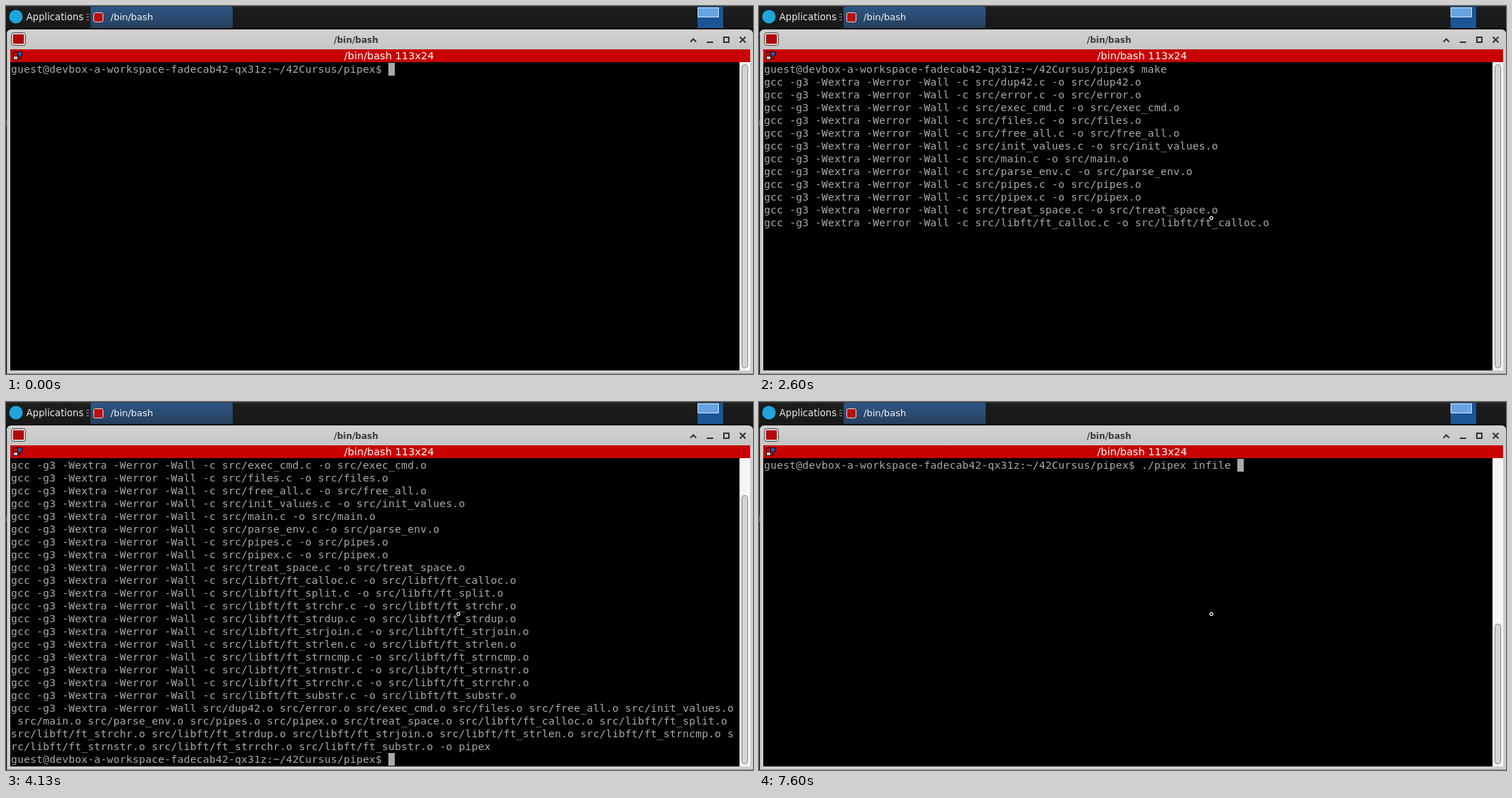
Animation of 1051x518 px, one loop 8 s. Source, as an HTML page with a canvas:

```html
<!DOCTYPE html>
<html lang="en">
<head>
<meta charset="utf-8">
<title>Terminal build</title>
<style>
  html, body { margin: 0; width: 100%; height: 100%; overflow: hidden; background: #000; }
  canvas { display: block; }
</style>
</head>
<body>
<canvas id="stage" width="1051" height="518"></canvas>
<script>
const ctx = document.getElementById('stage').getContext('2d', { alpha: false });
const LOOP = 8000, COLS = 113, ROWS = 24, CELL = 9, LINE = 18;
const ENTER = 1610, LINE_TIME = 88, SCROLL = 3385, PROMPT_BACK = 3600, CLEAR = 4270;
const SANS = '"DejaVu Sans", sans-serif', MONO = '"DejaVu Sans Mono", monospace';
const PROMPT = 'guest@devbox-a-workspace-fadecab42-qx31z:~/42Cursus/pipex$ ';

const files = [
  ...'dup42 error exec_cmd files free_all init_values main parse_env pipes pipex treat_space'.split(' '),
  ...'calloc split strchr strdup strjoin strlen strncmp strnstr strrchr substr'.split(' ').map(f => 'libft/ft_' + f)
].map(f => 'src/' + f);
const GCC = 'gcc -g3 -Wextra -Werror -Wall ';
const compileLines = files.map(f => `${GCC}-c ${f}.c -o ${f}.o`);
const linkLines = (GCC + files.map(f => f + '.o').join(' ') + ' -o pipex').match(new RegExp(`.{1,${COLS}}`, 'g'));

// Typed input: [time, command line so far]
const buildInput = [[0, ''], [1270, 'm'], [1400, 'ma'], [1470, 'mak'], [1530, 'make']];
const runInput = [
  [CLEAR, ''], [4800, '.'], [5000, './'], [5265, './p'], [5325, './pi'], [5465, './pipex '],
  [6995, './pipex i'], [7465, './pipex in'], [7530, './pipex inf'], [7595, './pipex infile ']
];
const keyTimes = [1270, 1400, 1470, 1530, ENTER, CLEAR, 4800, 5000, 5265, 5325, 6995, 7465, 7530];

const latest = (input, t) => input.filter(([at]) => at <= t).pop()[1];

function terminalLines(t) {
  if (t >= CLEAR) return [PROMPT + latest(runInput, t)];
  const lines = [PROMPT + latest(buildInput, t)];
  if (t < ENTER) return lines;
  const printed = Math.floor((t - ENTER) / LINE_TIME) + 1;
  lines.push(...compileLines.slice(0, printed));
  if (printed > files.length) lines.push(...linkLines);
  lines.push(t >= PROMPT_BACK ? PROMPT : '');
  return lines;
}

function cursorVisible(t) {
  const last = keyTimes.filter(k => k <= t).pop();
  return last === undefined || Math.floor((t - last) / 600) % 2 === 0;
}

function rect(x, y, w, h, fill) {
  ctx.fillStyle = fill;
  ctx.fillRect(x, y, w, h);
}

function rounded(x, y, w, h, r, fill, stroke) {
  ctx.beginPath();
  ctx.roundRect(x, y, w, h, r);
  ctx.fillStyle = fill;
  ctx.fill();
  if (stroke) {
    ctx.strokeStyle = stroke;
    ctx.lineWidth = 1;
    ctx.stroke();
  }
}

function label(text, x, y, font, fill, align = 'left') {
  ctx.font = font;
  ctx.fillStyle = fill;
  ctx.textAlign = align;
  ctx.fillText(text, x, y);
}

function path(d, stroke, width) {
  ctx.strokeStyle = stroke;
  ctx.lineWidth = width;
  ctx.stroke(new Path2D(d));
}

function vertical(y0, y1, top, bottom) {
  const g = ctx.createLinearGradient(0, y0, 0, y1);
  g.addColorStop(0, top);
  g.addColorStop(1, bottom);
  return g;
}

function drawPanel() {
  rect(0, 0, 1051, 518, '#101010');
  rect(0, 0, 1051, 31, vertical(0, 31, '#1d1d1d', '#181818'));
  rect(0, 0, 1051, 1, '#3c3c3c');
  rect(0, 160, 1, 9, '#1d5a94');
  ctx.beginPath();
  ctx.arc(14, 15, 9.5, 0, 7);
  ctx.fillStyle = '#1ea5dc';
  ctx.fill();
  label('Applications', 28.5, 20, '13.2px ' + SANS, '#eeeeee');
  for (const y of [11, 15, 19]) rect(113, y, 4, 1, '#8c8c8c');
  rounded(119, 1, 200, 30, 2, vertical(1, 31, '#2d5686', '#263f5c'));
  rounded(123.5, 9.5, 13, 13, 2, '#b80f0f', '#e8d4d0');
  label('/bin/bash', 147, 20, '13px ' + SANS, '#f4f4f4');
  rect(973, 1, 36, 30, '#1b5596');
  rect(973, 2, 30, 14, '#d5e5f7');
  rect(974, 3, 28, 12, '#68a3e3');
}

function drawWindow() {
  rounded(1, 33, 1050, 490, [6, 6, 0, 0], vertical(33, 61, '#d2d2d2', '#c6c6c6'));
  rect(1, 61, 1050, 457, '#cecece');
  rect(1, 40, 1, 478, '#9c9c9c');
  rect(1, 517, 1050, 1, '#8f8f8f');
  rounded(7.5, 37.5, 20, 18, 3, '#d8c8c8', '#555555');
  rounded(10, 40, 15, 13, 1, '#b30909');
  label('/bin/bash', 492.5, 52, 'bold 12px ' + SANS, '#3a3a3a', 'center');
  path('M963 50.5 L967 46.5 L971 50.5', '#333', 2);
  path('M986 51 H995', '#333', 2);
  path('M1010 44 H1017 V51 H1010 Z', '#333', 2);
  path('M1032.5 43.5 L1040.5 51.5 M1040.5 43.5 L1032.5 51.5', '#333', 2);

  rect(6, 61, 1041, 18, '#c80000');
  rect(10, 64, 13, 12, '#1a0808');
  rect(11, 65, 5, 5, '#c80000');
  rect(17, 65, 5, 5, '#1d5fae');
  rect(11, 71, 5, 4, '#c9c9c9');
  rect(17, 71, 6, 5, '#c80000');
  rect(18, 73, 4, 1, '#1a0808');
  rect(19, 74, 2, 1, '#1a0808');
  label('/bin/bash 113x24', 539, 75, '14.5px ' + SANS, '#ffffff', 'center');
  rect(6, 79, 1026, 434, '#000000');
  rect(1032, 79, 15, 434, '#f6f6f6');
}

function drawScrollbar(t) {
  const top = t < SCROLL ? 82 : t < CLEAR ? 131 : 312;
  rounded(1035.5, top + 0.5, 8, 509 - top, 4, '#d4d4d4', '#858585');
}

function drawTerminal(t) {
  const lines = terminalLines(t);
  const visible = lines.slice(-ROWS);
  ctx.font = '14.667px ' + MONO;
  ctx.textAlign = 'left';
  ctx.fillStyle = '#aaaaaa';
  visible.forEach((line, row) => {
    [...line].forEach((char, col) => {
      if (char !== ' ') ctx.fillText(char, 7 + col * CELL, 94 + row * LINE);
    });
  });
  if (cursorVisible(t)) {
    const row = visible.length - 1;
    ctx.fillRect(7 + visible[row].length * CELL, 80 + row * LINE, CELL, LINE);
  }
}

function drawPointer(t) {
  if (t < 330) return;
  if (t >= 1270) {
    ctx.beginPath();
    ctx.arc(636.5, 298.5, 2.1, 0, 7);
    ctx.fillStyle = '#000';
    ctx.fill();
    ctx.strokeStyle = '#fff';
    ctx.lineWidth = 1.1;
    ctx.stroke();
    return;
  }
  // The text pointer glides in from below and comes to rest.
  const left = (1 - Math.min(1, (t - 310) / 350)) ** 2;
  ctx.save();
  ctx.translate(Math.round(636 + 26 * left) + 0.5, Math.round(298 + 220 * left) + 0.5);
  const beam = 'M-3 -7 H-1 L0 -6 L1 -7 H3 M0 -6 V6 M-3 7 H-1 L0 6 L1 7 H3';
  path(beam, '#fff', 3);
  path(beam, '#000', 1);
  ctx.restore();
}

let start;
function frame(now) {
  start ??= now;
  const t = (now - start) % LOOP;
  drawPanel();
  drawWindow();
  drawScrollbar(t);
  drawTerminal(t);
  drawPointer(t);
  requestAnimationFrame(frame);
}
requestAnimationFrame(frame);
</script>
</body>
</html>
```
